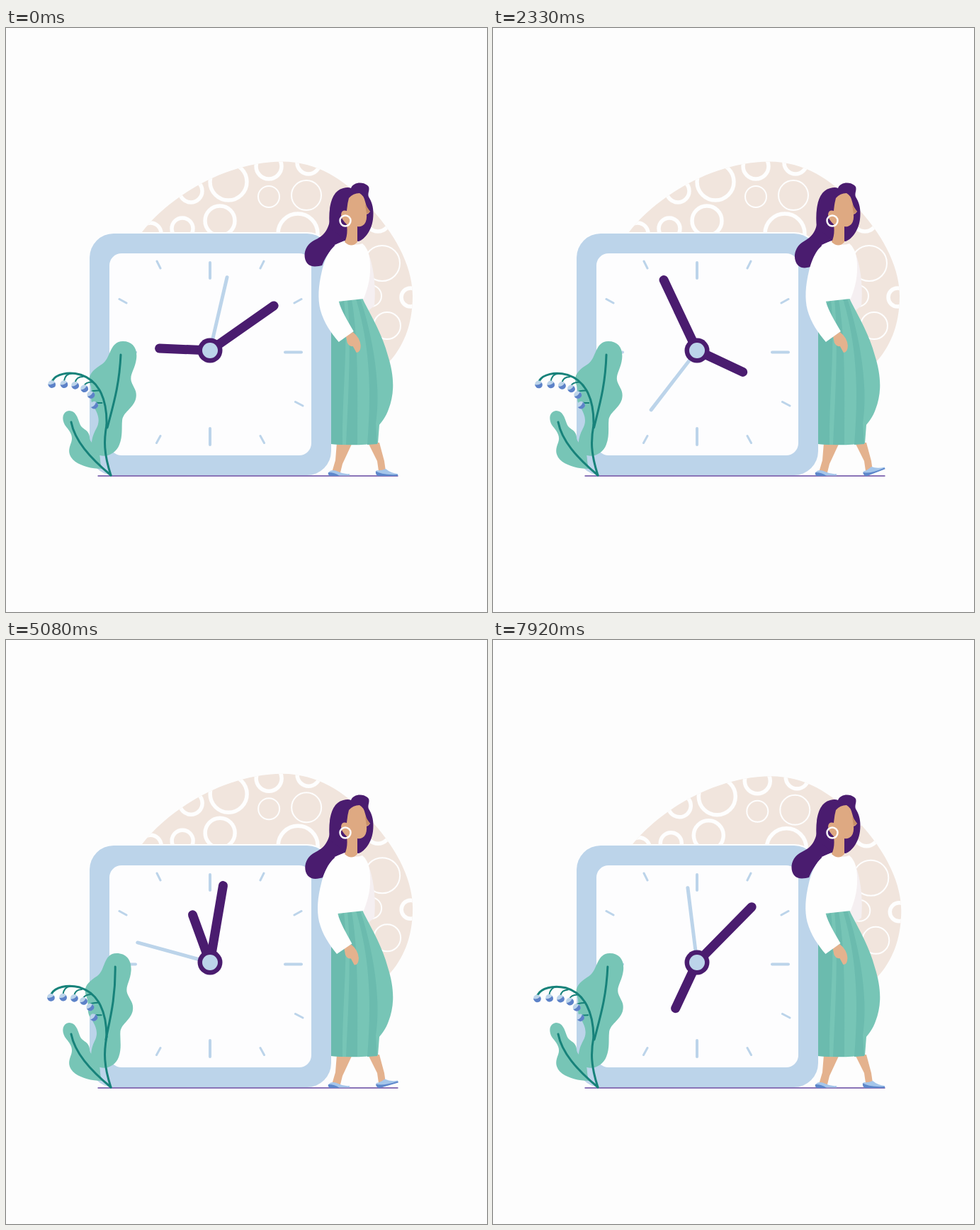
Animation, 679 px wide and 824 px high, one loop 8 s. Source, as an HTML page:

```html
<!DOCTYPE html>
<html lang="en">
<head>
<meta charset="utf-8">
<title>Waiting by the clock</title>
<style>
  html, body { margin: 0; width: 100%; height: 100%; overflow: hidden; background: #fdfdfd; }
  svg { display: block; width: 679px; height: 824px; }
  .line, .vein, .thick, .thin { fill: none; stroke-linecap: round; stroke-linejoin: round; }
  .thick { stroke: #fefefe; stroke-width: 5.5; }
  .thin { stroke: #fefefe; stroke-width: 2; }
  .sky { stroke: #bcd4ea; }
  .plum { stroke: #4a1c6f; stroke-width: 13; }
  .vein { stroke: #17827a; stroke-width: 3; }
  .stalk { stroke-width: 2; }
  .hair { fill: #4a1c6f; }
  .green { fill: #77c5b6; }
  .skin { fill: #e4b28e; }
  .face { fill: #dea982; }
  .cloth { fill: #fefefe; }
  .shoe { fill: #a5c6ea; }
  .sole { fill: #5d87cb; }
</style>
</head>
<body>
<svg viewBox="0 0 679 824">
  <defs>
    <path id="blobShape" d="M185 298C215 250 300 189 390 188.500C440 189 477 213 511 250C556 297 574 343 574 378C574 420 560 451 540 472L440 500H200Z"/>
    <clipPath id="blobClip"><use href="#blobShape"/></clipPath>
  </defs>

  <g id="blob">
    <use href="#blobShape" fill="#f1e5dd"/>
    <g clip-path="url(#blobClip)">
      <g class="thick">
        <circle cx="204" cy="290" r="15"/><circle cx="249" cy="283" r="15"/>
        <circle cx="302" cy="272" r="21"/><circle cx="261" cy="230" r="16"/>
        <circle cx="314" cy="217" r="26"/><circle cx="371" cy="195" r="18"/>
        <circle cx="427" cy="190" r="16"/><circle cx="412" cy="290" r="28"/>
        <circle cx="525" cy="270" r="17"/><circle cx="571" cy="380" r="13"/>
      </g>
      <g class="thin">
        <circle cx="371" cy="238" r="15"/><circle cx="424" cy="236" r="21"/>
        <circle cx="531" cy="332" r="25"/><circle cx="515" cy="378" r="15"/>
        <circle cx="538" cy="420" r="19"/>
      </g>
    </g>
  </g>

  <rect x="118" y="288" width="341" height="60" rx="34" fill="#fefefe"/>
  <rect x="118" y="290" width="341" height="341" rx="34" fill="#bcd4ea"/>
  <rect x="146" y="318" width="285" height="285" rx="17" fill="#fdfdfe"/>
  <g class="line sky" stroke-width="3">
    <path stroke-width="4" d="M288 331V353M288 565V588M394 457.500H417M161 457.500H183"/>
    <path d="M213 329L218 339M364 329L359 339M160 382.500L170 388M417 382.500L407 388M408.500 527.500L419 533M218 575.500L212.500 585.500M359 575.500L364.500 585.500"/>
  </g>
  <path id="second" class="line sky" stroke-width="5" d="M288 455V349"/>
  <path id="hour" class="line plum" d="M288 455V383.500"/>
  <path id="minute" class="line plum" d="M288 455V345"/>
  <circle cx="288" cy="455" r="17.500" fill="#4a1c6f"/>
  <circle cx="288" cy="455" r="11" fill="#bcd4ea"/>

  <path class="line" stroke="#6547a0" stroke-width="1.400" d="M130 632H553"/>

  <path class="green" d="M89 540C98 540 101 549 104 558C107 567 117 566 118 577C118 587 129 588 131 598C134 607 132 614 136 622C120 622 107 618 98 612C87 603 88 595 92 585C96 574 88 567 83 560C78 551 80 541 89 540Z"/>
  <path class="vein" d="M92 556C97 582 118 606 148 631"/>
  <g id="leaf">
    <path class="green" d="M165 442C179 442 186 452 184 467C182 482 174 489 177 499C180 508 186 512 183 524C179 537 165 542 164 554C163 564 165 576 160 588C155 601 139 608 128 601C117 592 121 577 127 566C134 554 130 544 123 533C117 523 123 515 119 503C114 490 123 482 136 474C148 466 146 442 165 442Z"/>
    <path class="vein" d="M162 461C160 505 151 533 143 564"/>
  </g>
  <path class="vein" d="M148 631C138 600 138 582 142 560"/>
  <g id="flower">
    <path class="vein" d="M142 560C143 526 133 498 106 489C88 484 71 488 66 497"/>
  </g>

  <path id="tail" class="hair" d="M461 250C457 276 456 290 436 299C421 306 418 323 425 332C431 339 441 336 446 335C453 318 463 303 490 298Z"/>
  <path class="hair" d="M457 282C455 262 456 231 476 226Q483 224 487 226C490 217 506 216 512 224C514 230 509 234 513 240C519 250 519 261 518 270C516 286 507 297 498 301L478 299Z"/>
  <path fill="#f5eff1" d="M505 306C517 322 523 358 520 392L510 400L498 370Z"/>

  <path class="skin" d="M467 585H489L475 615L472 627H460L465 610Z"/>
  <path class="skin" d="M511 585H527L534 611L536 625H526L524 611Z"/>
  <path class="shoe" d="M456 626Q461 622 469 626Q477 630 485 629V631.500H457Z"/>
  <path class="sole" d="M455 627Q464 627 471 632H457Q454 630 455 627Z"/>
  <g id="foot">
    <path class="shoe" d="M523 624Q529 625 536 622Q543 628 553 629V631.500H524Z"/>
    <path class="sole" d="M522 625Q529 631 553 630V632H525Q521 630 522 625Z"/>
  </g>

  <path class="green" d="M469 384L503 381C511 399 530 428 539 462C548 490 549 515 540 538C536 549 531 555 527 560L525 586Q490 590 459 587V425Z"/>
  <path fill="#6bbbae" d="M469 390L477 384C484 440 474 520 475 588L459 587V425ZM482 384L488 383C498 440 496 520 496 588H480C483 520 488 440 482 384ZM494 382L500 381C518 436 530 505 522 558L524 587L510 588C516 510 514 450 494 382Z"/>

  <path class="cloth" d="M478 300Q491 309 503 304Q513 312 514 332C515 352 511 366 505 382L468 386L461 345L464 306Z"/>
  <g id="arm">
    <path class="skin" d="M480 434L490 429Q500 437 501 448Q501 458 495 458L490 449Q485 450 482 444Z"/>
    <path class="cloth" d="M480 301C462 302 452 319 446 343C441 364 440 382 444 398C449 416 459 430 470 443L491 428C482 412 474 400 470 386L482 340Z"/>
  </g>

  <path class="face" d="M484 240Q490 233 499 233Q505 236 507 245Q509 254 514 259Q512 262 509 263Q510 275 503 279Q499 281 496 280L496 302Q488 311 478 302Q483 292 481 277Q473 270 473 263Q474 256 481 258Q482 247 484 240Z"/>
  <path fill="#c68d68" d="M507 249L514 259L509 262Z"/>
  <circle cx="479" cy="272" r="7.500" class="thin" style="stroke-width:2.5"/>
</svg>
<script>
const LOOP = 8000, CYCLE = 10000, FPS = 12;
const el = id => document.getElementById(id);
const move = (id, transform) => el(id).setAttribute('transform', transform);
const clamp = v => Math.max(0, Math.min(1, v));
const wave = (t, period, peak) => Math.cos(2 * Math.PI * (t / period - peak));
const smooth = u => u * u * (3 - 2 * u);
const settle = x => (1 + x) * Math.exp(-x);
const bump = (t, mid, half) => Math.cos(Math.PI / 2 * Math.min(1, Math.abs(t - mid) / half)) ** 2;

// Bells hang along a curve, each on a short bent stalk.
for (let i = 0; i < 6; i++) {
  const x = 65 + 60 * Math.sin(.29 * i), y = 502 + 30 * (i / 5) ** 3;
  const rise = 18 - 3 * i;
  const stalk = i ? `<path class="vein stalk" d="M${x} ${y - 4}Q${x + 2} ${y - rise} ${x + 11} ${y - rise}"/>` : '';
  el('flower').innerHTML += `${stalk}
    <g transform="translate(${x} ${y}) rotate(${10 - 6 * i})"><circle r="5.3" fill="#bcd4ea"/>
    <path fill="#5d82c8" d="M-5.300 1Q0 2 4 -3Q7 1 4 4Q-2 8 -5.300 1Z"/></g>`;
}

// Every hand spins quickly, then creeps on to its resting angle.
const hands = {
  hour: { rest: 632.4, creep: 600, spin: -600, lag: 190 },
  minute: { rest: 415, creep: 93, spin: 267, lag: 218 },
  second: { rest: 373.1, creep: 180, spin: 180, lag: 260 }
};

function draw(t) {
  for (const [id, h] of Object.entries(hands)) {
    const angle = h.rest - h.creep * (1 - smooth(t / CYCLE)) - h.spin * settle(t / h.lag);
    move(id, `rotate(${angle} 288 455)`);
  }
  move('blob', `translate(${6.3 * bump(t, 6800, 1900)} ${6 * bump(t, 7000, 2200)})`);

  const lean = 4.5 * (1 - wave(t, 2000, 0)) / 160;
  move('leaf', `matrix(1 0 ${lean} 1 ${-602 * lean} 0)`);

  const nod = (.5 + .5 * wave(t, 2000, .8)) * clamp(.15 + t / 600);
  move('flower', `rotate(${-3.5 * nod} 142 560)`);

  const sway = .5 + .5 * wave(t, 1000, .45);
  move('tail', `rotate(${-5 * sway} 463 262)`);

  move('arm', `rotate(${.65 - .65 * wave(t, 2000, .1)} 470 308)`);

  const tap = clamp(.5 - 1.6 * (wave(t, 4000 / 3, 0) - .55));
  move('foot', `translate(${2 * tap} 0) rotate(${-21 * tap} 526 631)`);
}

const start = performance.now();
function tick() {
  const elapsed = Math.max(0, performance.now() - start) % LOOP;
  draw(Math.floor((elapsed + 4) * FPS / 1000) % (LOOP * FPS / 1000) * 1000 / FPS);
  requestAnimationFrame(tick);
}
draw(0);
requestAnimationFrame(tick);
</script>
</body>
</html>
```
